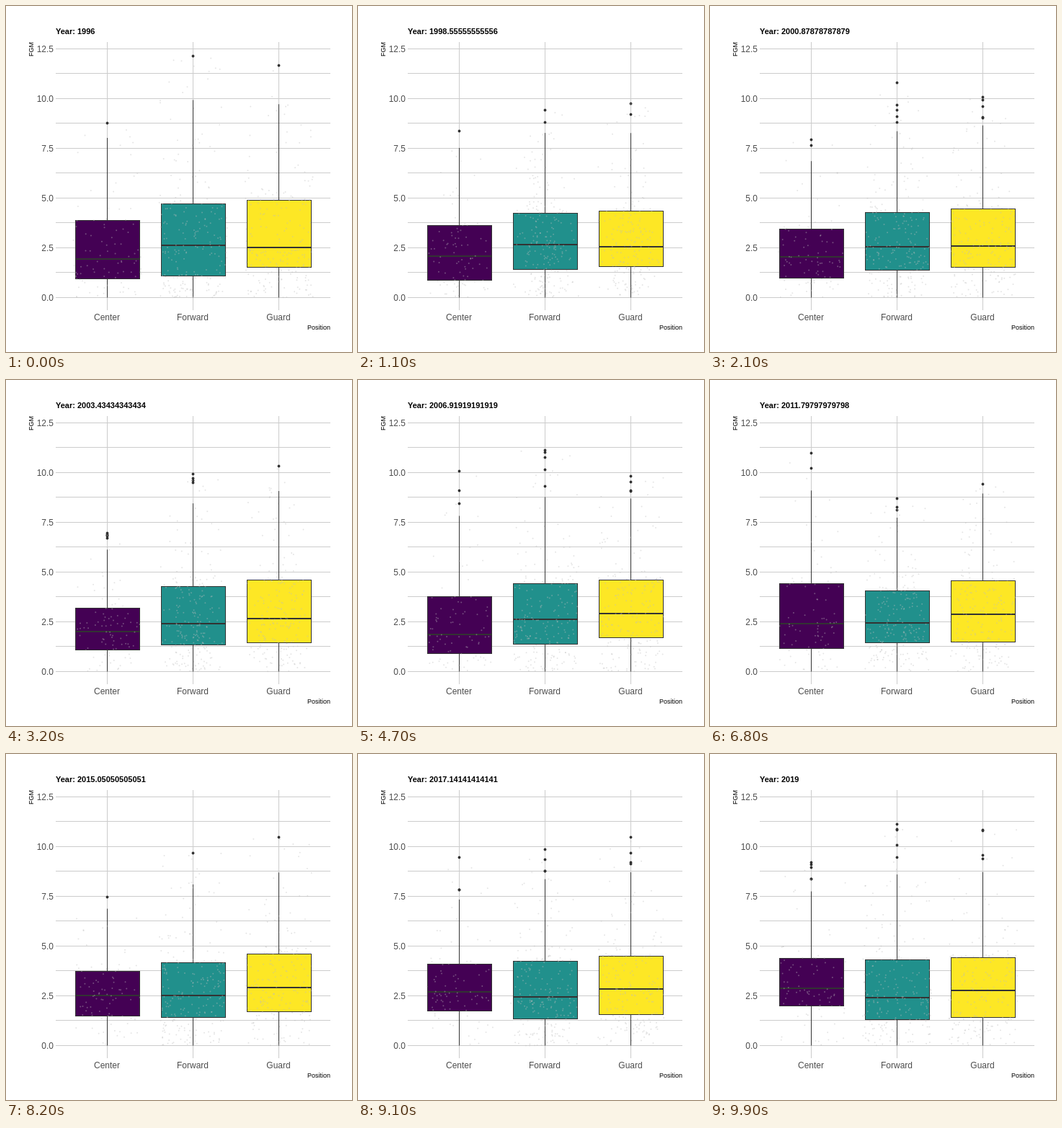
An HTML page with a canvas that plays this animation: 480x480 px, repeating every 10000 ms.

```html
<!DOCTYPE html>
<html lang="en">
<head>
<meta charset="utf-8">
<title>FGM by position</title>
<style>
html, body { margin: 0; width: 100%; height: 100%; overflow: hidden; background: #fff; }
canvas { display: block; }
</style>
</head>
<body>
<canvas id="stage" width="480" height="480"></canvas>
<script>
const ctx = document.getElementById("stage").getContext("2d");
const STEP = 100, FRAMES = 100, YEARS = 23;
const FONT = '"Liberation Sans", Arial, sans-serif';
const INK = "#333", GRID = "#ccc", LABEL = "#4d4d4d";

// Key steps for the quartiles [q1, median, q3]; linear in between.
const keys = [0, 11, 32, 47, 68, 82, 99];
const groups = [
  { name: "Center", fill: "#440154", count: 90, quartiles: [
    [.95, 1.94, 3.88], [.87, 2.08, 3.63], [1.08, 2, 3.2], [.9, 1.86, 3.77],
    [1.15, 2.4, 4.43], [1.48, 2.52, 3.74], [2, 2.88, 4.4]] },
  { name: "Forward", fill: "#21908c", count: 220, quartiles: [
    [1.08, 2.63, 4.72], [1.4, 2.67, 4.25], [1.33, 2.4, 4.28], [1.37, 2.63, 4.43],
    [1.46, 2.45, 4.07], [1.4, 2.52, 4.18], [1.3, 2.4, 4.32]] },
  { name: "Guard", fill: "#fde725", count: 200, quartiles: [
    [1.52, 2.53, 4.9], [1.57, 2.55, 4.35], [1.45, 2.66, 4.6], [1.7, 2.92, 4.6],
    [1.5, 2.88, 4.58], [1.7, 2.92, 4.6], [1.4, 2.77, 4.43]] }
];
groups.forEach((g, i) => { g.id = i; g.x = 140.5 + 119 * i; });

const lerp = (a, b, t) => a + (b - a) * t;
const yOf = v => 404.5 - v * 27.6;
const snap = y => Math.ceil(y) - .5;

// Repeatable random number in 0..1
function rand(a, b, c) {
  let h = Math.imul(a + 1, 374761393) ^ Math.imul(b + 7, 668265263) ^ Math.imul(c + 3, 2147483629);
  h = Math.imul(h ^ h >>> 15, 2246822519);
  h = Math.imul(h ^ h >>> 13, 3266489917);
  return ((h ^ h >>> 16) >>> 0) / 4294967296;
}

// Random value drawn anew every year and tweened between years
function yearly(i, time, channel) {
  const year = Math.floor(time);
  return lerp(rand(i, year, channel), rand(i, year + 1, channel), time - year);
}

// Whiskers end just inside the fence at 1.5 box heights; outliers lie beyond it.
function statsAt(g, frame, time) {
  const k = Math.max(0, keys.findIndex(key => key >= frame) - 1);
  const t = (frame - keys[k]) / (keys[k + 1] - keys[k]);
  const [q1, med, q3] = g.quartiles[k].map((v, i) => lerp(v, g.quartiles[k + 1][i], t));
  const fence = q3 + 1.5 * (q3 - q1);
  const size = 1 + Math.floor(rand(g.id, Math.floor(time), 50) * 5);
  const out = Array.from({ length: size }, (_, i) => fence + .1 + 2.2 * yearly(i, time, 60 + g.id) ** 2);
  return { lo: 0, q1, med, q3, hi: fence - .25, out };
}

function quantile(s, u) {
  const q = Math.min(3, Math.floor(u * 4)), t = u * 4 - q;
  if (q === 3) return lerp(s.q3, Math.max(...s.out), t ** 2);
  const marks = [s.lo, s.q1, s.med, s.q3];
  return lerp(marks[q], marks[q + 1], t);
}

function line(x1, y1, x2, y2, color, width = 1) {
  ctx.strokeStyle = color;
  ctx.lineWidth = width;
  ctx.beginPath();
  ctx.moveTo(x1, y1);
  ctx.lineTo(x2, y2);
  ctx.stroke();
}

function dot(x, y, r, color) {
  ctx.fillStyle = color;
  ctx.beginPath();
  ctx.arc(x, y, r, 0, 7);
  ctx.fill();
}

function text(str, x, y, size, color = "#000", align = "left", weight = "") {
  ctx.font = `${weight} ${size}px ${FONT}`;
  ctx.fillStyle = color;
  ctx.textAlign = align;
  ctx.fillText(str, x, y);
}

function drawAxes() {
  for (let i = 0; i <= 10; i++) {
    const v = i * 1.25, y = snap(yOf(v));
    line(69, y, 450, y, GRID);
    if (i % 2 === 0) text(v.toFixed(1), 66, y + 4.5, 12, LABEL, "right");
  }
  for (const g of groups) {
    line(g.x, 50, g.x, 422, GRID);
    text(g.name, g.x - .5, 436, 12, LABEL, "center");
  }
  text("Position", 450, 449, 9, "#000", "right");
  ctx.save();
  ctx.translate(38, 50);
  ctx.rotate(-Math.PI / 2);
  text("FGM", 0, 0, 9, "#000", "right");
  ctx.restore();
}

function drawBox(g, s) {
  const left = g.x - 44, width = 89;
  const top = snap(yOf(s.q3)), bottom = snap(yOf(s.q1)), mid = Math.round(yOf(s.med));
  for (const v of s.out) dot(g.x, snap(yOf(v)), 1.9, INK);
  line(g.x, yOf(s.hi), g.x, yOf(s.lo), INK);
  ctx.fillStyle = g.fill;
  ctx.fillRect(left, top, width, bottom - top);
  ctx.strokeRect(left, top, width, bottom - top);
  line(left, mid, left + width, mid, INK, 2);
}

// The cloud narrows between years because its jitter is averaged there.
function drawPoints(g, s, time) {
  for (let i = 0; i < g.count; i++) {
    const shift = k => yearly(i, time, g.id * 3 + k) - .5;
    const u = Math.abs(rand(i, 99, g.id) + shift(0) * .3);
    const rank = u > 1 ? 2 - u : u;
    dot(g.x + shift(1) * 95, yOf(quantile(s, rank)), 1, "rgba(190,190,190,.4)");
  }
}

function draw() {
  const frame = Math.floor(performance.now() / STEP) % FRAMES;
  const time = frame * YEARS / (FRAMES - 1);
  ctx.fillStyle = "#fff";
  ctx.fillRect(0, 0, 480, 480);
  drawAxes();
  for (const g of groups) {
    const stats = statsAt(g, frame, time);
    drawBox(g, stats);
    drawPoints(g, stats, time);
  }
  text("Year: " + Number((1996 + time).toPrecision(15)), 69, 39, 11, "#000", "left", "bold");
  requestAnimationFrame(draw);
}
draw();
</script>
</body>
</html>
```
